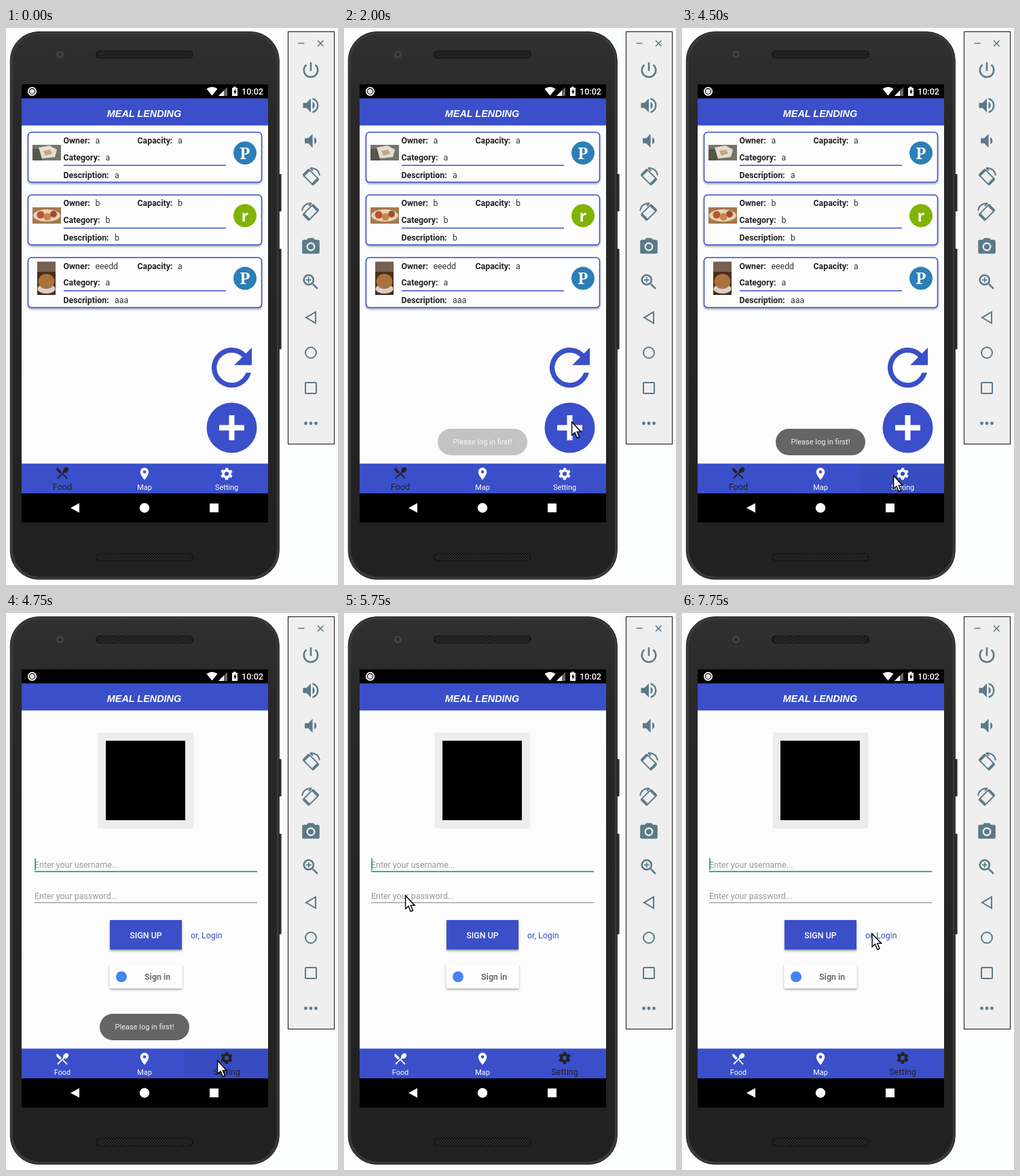
An HTML page for the animation above (8 s loop, 489 by 820 pixels).

```html
<!DOCTYPE html>
<html lang="en">
<head>
<meta charset="utf-8">
<title>Phone app demo</title>
<style>
html, body { margin: 0; width: 100%; height: 100%; overflow: hidden; background: #fcfdfd; }
svg { display: block; width: 100%; height: 100%; font-family: Roboto, sans-serif; }
</style>
</head>
<body>
<svg id="stage" viewBox="0 0 489 820"></svg>
<script>
const BLUE = '#3a4fc9', STEEL = '#5b7a88', TEAL = '#168a80', INK = '#222';
const LOOP = 8000;

const text = (x, y, str, size, fill, extra = '') =>
  `<text x="${x}" y="${y}" font-size="${size}" fill="${fill}" ${extra}>${str}</text>`;
const rect = (x, y, w, h, fill, extra = '') =>
  `<rect x="${x}" y="${y}" width="${w}" height="${h}" fill="${fill}" ${extra}/>`;
const circle = (x, y, r, fill, extra = '') =>
  `<circle cx="${x}" cy="${y}" r="${r}" fill="${fill}" ${extra}/>`;
const path = (d, fill, extra = '') => `<path d="${d}" fill="${fill}" ${extra}/>`;
const group = (id, body) => `<g id="${id}">${body}</g>`;
const line = color => `stroke="${color}" stroke-width="2"`;
// 24-unit icon centred on (x, y)
const icon = (d, x, y, scale, fill) =>
  path(d, fill, `transform="translate(${x} ${y}) scale(${scale}) translate(-12 -12)"`);

const ICONS = {
  power: 'M13 3h-2v10h2zm4.83 2.17l-1.42 1.42A7 7 0 1 1 7.58 6.58L6.17 5.17a9 9 0 1 0 11.66 0z',
  loud: 'M3 9v6h4l5 5V4L7 9zm13.5 3c0-1.77-1.02-3.29-2.5-4.03v8.05c1.48-.73 2.5-2.25 2.5-4.02zM14 3.23v2.06a7 7 0 0 1 0 13.42v2.06a9 9 0 0 0 0-17.54z',
  quiet: 'M18.5 12c0-1.77-1.02-3.29-2.5-4.03v8.05c1.48-.73 2.5-2.25 2.5-4.02zM5 9v6h4l5 5V4L9 9z',
  camera: 'M9 2L7.17 4H4a2 2 0 0 0-2 2v12a2 2 0 0 0 2 2h16a2 2 0 0 0 2-2V6a2 2 0 0 0-2-2h-3.17L15 2zm3 15a5 5 0 1 1 0-10a5 5 0 0 1 0 10zm0-1.8a3.2 3.2 0 1 0 0-6.4a3.2 3.2 0 0 0 0 6.4z',
  zoom: 'M15.5 14h-.79l-.28-.27A6.5 6.5 0 1 0 13.73 14.43l.27.28v.79l5 4.99L20.49 19zm-6 0a4.5 4.5 0 1 1 0-9a4.5 4.5 0 0 1 0 9zM12.5 10.2h-2.3v2.3H8.8v-2.3H6.5V8.8h2.3V6.5h1.4v2.3h2.3z',
  food: 'M8.1 13.34l2.83-2.83L3.91 3.5a4 4 0 0 0 0 5.66zm6.78-1.81c1.53.71 3.68.21 5.27-1.38 1.91-1.91 2.28-4.65.81-6.12-1.46-1.46-4.2-1.1-6.12.81-1.59 1.59-2.09 3.74-1.38 5.27L3.7 19.87l1.41 1.41L12 14.41l6.88 6.88 1.41-1.41L13.41 13z',
  pin: 'M12 2a7 7 0 0 0-7 7c0 5.25 7 13 7 13s7-7.75 7-13a7 7 0 0 0-7-7zm0 9.5a2.5 2.5 0 1 1 0-5a2.5 2.5 0 0 1 0 5z',
  refresh: 'M17.65 6.35A8 8 0 1 0 19.73 14h-2.08A6 6 0 1 1 16.22 7.78L13 11h7V4z'
};

function phone() {
  const grille = y => rect(132, y, 144, 12, '#161616', 'rx="6"') + rect(134, y + 1, 140, 10, 'url(#mesh)', 'rx="5"');
  return rect(401, 215, 4.6, 55, '#2c2c2c', 'rx="1"') + rect(401, 325, 4.6, 148, '#2c2c2c', 'rx="1"') +
    rect(6.3, 5.6, 396, 806, '#3a3a3a', 'rx="42" stroke="#1b1b1b"') +
    rect(10, 9, 389, 799, 'url(#body)', 'rx="40"') +
    grille(33) + grille(773) +
    circle(79.5, 39, 5.5, '#414345') + circle(79.5, 39, 2.5, '#272b2e') +
    rect(23, 83, 363, 645, '#000');
}

function statusBar() {
  return circle(38.5, 93.3, 5.6, '#000', 'stroke="#fff" stroke-width="1.8"') + circle(38.5, 93.3, 3.6, '#ddd') +
    path('M295.5 89.5Q303.5 84 311.5 89.5L303.5 99.5z', '#fff') +
    path('M313 100L326 87V100z', '#666') + path('M313 100L321 92V100z', '#fff') +
    path('M333 88h2v-1.5h3.5V88h2.5v12h-8z', '#fff') + path('M338 89.5l-3 5h1.7v3.5l3-5H338z', '#000') +
    text(347, 98, '10:02', 12.6, '#fff', 'font-weight="500"') +
    rect(23, 103.6, 363, 39.9, BLUE) +
    text(203.5, 131, 'MEAL LENDING', 14.4, '#fff',
      'text-anchor="middle" font-weight="700" font-style="italic" font-family="Liberation Sans, sans-serif"');
}

const PHOTOS = [
  rect(39, 172, 42, 23, '#77746a') + path('M39 178h10l4 17H39z', '#535847') +
    path('M48 176l16-3 11 6-3 11-19 2z', '#e2ddd3') + path('M55 181l10-2 3 6-10 3z', '#c2a685'),
  rect(39, 264, 42, 24, '#a4784f') + '<ellipse cx="60" cy="276" rx="20" ry="9" fill="#e3d3b5"/>' +
    circle(51, 275, 5.5, '#b9552e') + circle(61, 278, 5.5, '#c98548') + circle(70, 274, 5, '#a94832'),
  rect(46, 344, 27, 49, '#4a2c20') + rect(46, 344, 27, 15, '#76604f') +
    '<ellipse cx="59.5" cy="384" rx="13" ry="7" fill="#d9d0c5"/>' + '<ellipse cx="59.5" cy="373" rx="12" ry="11" fill="#aa713c"/>'
];

function card(i, owner, capacity, category, about, letter) {
  const y = 153.5 + i * 92.3;
  const field = (x, dy, label, vx, value) =>
    text(x, y + dy, label + ':', 12.35, INK, 'font-weight="700"') + text(vx, y + dy, value, 12.35, '#333');
  const green = letter === 'r';
  const face = green ? 'Open Sans, sans-serif' : 'Noto Serif, serif';
  return rect(32.5, y, 344, 73.5, '#fdfdfd', `rx="5" stroke="${BLUE}" stroke-width="1.5" filter="url(#shade)"`) +
    field(84.5, 16.5, 'Owner', 131.5, owner) + field(193.5, 16.5, 'Capacity', 253, capacity) +
    field(84.5, 41, 'Category', 146.5, category) + field(84.5, 67, 'Description', 160, about) +
    rect(85, y + 48, 239, 1.5, BLUE) +
    circle(352, y + 30.5, 17, green ? '#7fb405' : '#2c7fb7') +
    text(352, y + 39, letter, 24, '#fff', `text-anchor="middle" font-weight="700" font-family="${face}"`) + PHOTOS[i];
}

function listPage() {
  return card(0, 'a', 'a', 'a', 'a', 'P') + card(1, 'b', 'b', 'b', 'b', 'r') +
    card(2, 'eeedd', 'a', 'a', 'aaa', 'P') +
    icon(ICONS.refresh, 332.5, 500, 3.69, BLUE) +
    circle(332.5, 588.5, 37, BLUE) +
    path('M314 588.5h37M332.5 570v37', 'none', 'stroke="#fff" stroke-width="8"');
}

function loginPage() {
  return rect(133.5, 176, 141, 141, '#ededed') + rect(145, 188, 117, 117, '#000') +
    text(40, 374.5, 'Enter your username...', 12.4, '#999') + rect(40, 379.8, 328, 1.6, TEAL) +
    text(40, 420.5, 'Enter your password...', 12.4, '#999') + rect(40, 426, 328, 1, '#858585') +
    group('caret', rect(40.3, 361, 1.5, 17.5, TEAL)) +
    rect(151, 452, 106, 43.5, BLUE, 'filter="url(#shade)"') +
    text(204, 479, 'SIGN UP', 12.4, '#fff', 'text-anchor="middle" font-weight="500"') +
    text(270, 479, 'or, Login', 12.4, BLUE) +
    rect(150.5, 517, 107, 35.5, '#fefefe', 'rx="1.5" filter="url(#shade)"') +
    circle(168, 535.5, 8, '#4285f4') +
    text(202, 540, 'Sign in', 12.4, '#6c6c6c', 'font-weight="700"');
}

function gear(x, y) {
  const pitch = 2 * Math.PI * 7.6 / 6;
  return `<g transform="translate(${x} ${y}) rotate(15)" fill="none" stroke="currentColor">
    <circle r="5" stroke-width="3.8"/>
    <circle r="7.6" stroke-width="2.6" stroke-dasharray="${pitch / 2}"/></g>`;
}

function tab(id, x, label, mark) {
  return group(id, `<g>${mark}</g><text x="${x}" y="679.5" text-anchor="middle" fill="currentColor">${label}</text>`);
}

function navBar() {
  return rect(23, 641.3, 363, 44, BLUE) + group('press', rect(262, 641.3, 124, 44, '#000', 'opacity=".04"')) +
    tab('foodTab', 83, 'Food', icon(ICONS.food, 83, 656.3, .93, 'currentColor')) +
    tab('mapTab', 204, 'Map', icon(ICONS.pin, 204, 656.3, .9, 'currentColor')) +
    tab('setTab', 325, 'Setting', gear(325, 656.3)) +
    rect(23, 685.3, 363, 42.7, '#000') +
    path('M95 706.5L108 699.5V713.5z', '#fff') + circle(204, 706.5, 7.2, '#fff') + rect(300, 700, 13, 13, '#fff');
}

function toolbar() {
  const turn = (y, flip) => `<g transform="translate(449 ${y}) scale(${flip} 1)" fill="none" ${line(STEEL)}>
    <g transform="translate(0 1.5) rotate(-45)"><rect x="-6" y="-10.5" width="12" height="21" rx="1.5"/>
    <path d="M-6 -9h12M-6 9h12" stroke-width="3"/></g>
    <path d="M-1 -12Q11 -12 13 -1M-1 -12l4 4"/></g>`;
  const big = (name, y) => icon(ICONS[name], 449, y, 1.28, STEEL);
  return rect(415.5, 5.5, 68, 607, '#efefef', 'stroke="#111"') +
    path('M430.5 22.5h9M459 18.5l8.5 8.5M467.5 18.5L459 27', 'none', `stroke="${STEEL}" stroke-width="1.6"`) +
    big('power', 62) + big('loud', 114) + big('quiet', 166) + turn(218, 1) + turn(270, -1) +
    big('camera', 322) + big('zoom', 374) +
    path('M456 418V434.5L442 426.3z', 'none', line(STEEL)) +
    circle(449, 478, 8, 'none', line(STEEL)) +
    rect(441, 522, 16, 16, 'none', line(STEEL) + ' rx="1"') +
    [441.5, 449, 456.5].map(x => circle(x, 582, 2.4, STEEL)).join('');
}

const stage = document.getElementById('stage');
stage.innerHTML = `<defs>
    <linearGradient id="body" x2="0" y2="1"><stop stop-color="#303030"/><stop offset=".15" stop-color="#282828"/><stop offset="1" stop-color="#212121"/></linearGradient>
    <pattern id="mesh" width="4" height="4" patternUnits="userSpaceOnUse"><rect width="2" height="2" fill="#2d2d2d"/><rect x="2" y="2" width="2" height="2" fill="#2d2d2d"/></pattern>
    <filter id="shade" x="-5%" y="-15%" width="110%" height="140%"><feDropShadow dx="0" dy="1.8" stdDeviation="1.6" flood-opacity=".38"/></filter>
    <clipPath id="view"><rect x="23" y="143.5" width="363" height="498"/></clipPath>
  </defs>` + rect(0, 0, 489, 820, '#fcfdfd') + phone() +
  rect(23, 143, 363, 499, '#fcfcfc') + statusBar() +
  '<g clip-path="url(#view)">' + group('list', listPage()) + group('login', loginPage()) + '</g>' + navBar() +
  group('toast', rect(138, 590, 132, 39, '#656565', 'rx="19.5"') +
    text(204, 613, 'Please log in first!', 11, '#f2f2f2', 'text-anchor="middle"')) +
  toolbar() +
  group('cursor', path('M.6 1V20.5L5 16.5L8.3 24.5L11.5 23L8.3 15.4H14z', '#fff', 'stroke="#000" stroke-width="1.4"'));

const el = id => document.getElementById(id);
const show = (id, on) => el(id).setAttribute('visibility', on ? 'visible' : 'hidden');

// [time, value...] steps; the latest one reached applies
const POINTER = [
  [500, 353, 558], [750, 335, 579], [3000, 319, 661], [3250, 311, 658], [5250, 172, 275],
  [5500, 112, 320], [5750, 90, 415], [6000, 240, 454], [6250, 297, 491], [6500, 260, 454],
  [6750, 250, 451], [7000, 272, 453], [7250, 279.5, 471]
];
const TOAST = [[0, 0], [2000, .37], [2250, .85], [2500, 1], [5250, .93], [5500, .45], [5750, 0]];
const at = (steps, t) => steps.filter(s => s[0] <= t).pop();

function setTab(id, active) {
  const node = el(id);
  node.setAttribute('color', active ? INK : '#fff');
  node.setAttribute('font-size', active ? 12.6 : 10.9);
  node.firstElementChild.setAttribute('transform', `translate(0 ${active ? -1.3 : 0})`);
}

function draw(t) {
  const login = t >= 4750;
  show('list', !login);
  show('login', login);
  el('login').setAttribute('transform', `translate(${t < 5000 ? 2 : 0} 0)`);
  show('caret', login && (t - 4750) % 1000 < 500);
  show('press', t >= 4500 && t < 5000);
  setTab('foodTab', !login);
  setTab('mapTab', false);
  setTab('setTab', login);
  el('toast').setAttribute('opacity', at(TOAST, t)[1]);
  const p = at(POINTER, t);
  show('cursor', p);
  if (p) el('cursor').setAttribute('transform', `translate(${p[1]} ${p[2]})`);
}

const start = performance.now();
function tick() {
  draw((performance.now() - start) % LOOP);
  requestAnimationFrame(tick);
}
draw(0);
requestAnimationFrame(tick);
</script>
</body>
</html>
```
